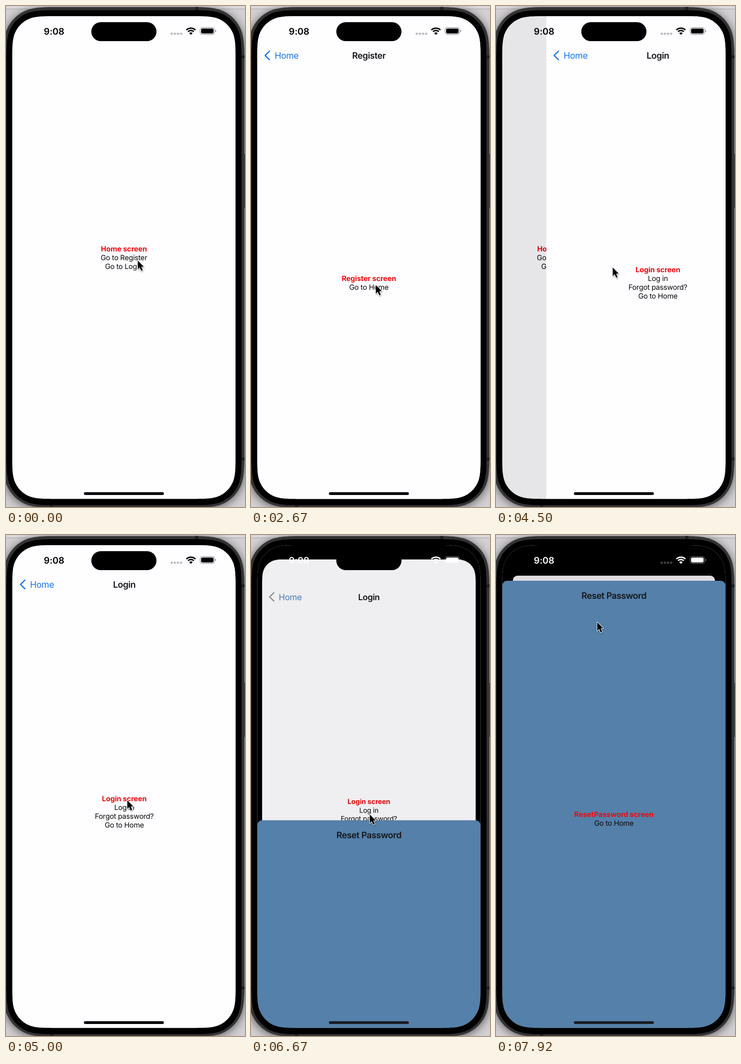
An HTML page that plays this animation: 517x1084 px, repeating every 8 s.

```html
<!DOCTYPE html>
<html lang="en">
<head>
<meta charset="utf-8">
<title>Screen navigation</title>
<style>
  html, body { margin: 0; width: 100%; height: 100%; overflow: hidden; background: #d3d0d4; }
  svg { display: block; width: 517px; height: 1084px; }
  text { font-family: Inter, "Liberation Sans", sans-serif; text-rendering: geometricPrecision; }
  .row { font-size: 15.6px; letter-spacing: -.28px; text-anchor: middle; fill: #080808; }
  .head { font-weight: 700; letter-spacing: -.1px; fill: #ee0a0c; }
  .nav { font-size: 19.1px; letter-spacing: -.42px; fill: #161618; }
  .title { font-weight: 600; letter-spacing: -.48px; text-anchor: middle; }
  .time { font-size: 19.8px; font-weight: 600; letter-spacing: -.1px; text-anchor: middle; }
</style>
</head>
<body>
<svg viewBox="0 0 517 1084" xmlns="http://www.w3.org/2000/svg">
  <defs>
    <clipPath id="screenClip"><path id="screenShape"/></clipPath>
    <clipPath id="pageClip"><path id="pageShape"/></clipPath>
    <filter id="soft" x="-20%" y="-20%" width="140%" height="140%"><feGaussianBlur stdDeviation="10"/></filter>
    <filter id="drop" x="-50%" y="-50%" width="220%" height="220%">
      <feDropShadow dx="0.6" dy="1.6" stdDeviation="1.1" flood-opacity=".4"/>
    </filter>
  </defs>

  <rect width="517" height="1084" fill="#d3d0d4"/>
  <rect width="517" height="6" fill="#dbd8dc"/>
  <rect y="6" width="517" height="1" fill="#a5a2a6"/>
  <path id="shade" fill="#000" opacity=".58" filter="url(#soft)"/>
  <rect x="514" y="320" width="3" height="117" fill="#232323"/>
  <path id="rim" fill="#333334" stroke="#555556"/>
  <g fill="#1f1f20">
    <rect x="409" y="2" width="7" height="8"/>
    <rect x="95" y="1079" width="7" height="5"/>
    <rect x="508" y="107" width="8" height="6"/>
    <rect x="508" y="977" width="8" height="6"/>
    <rect y="107" width="2" height="6"/>
    <rect y="977" width="2" height="6"/>
  </g>
  <path id="bezel" fill="#000"/>

  <g clip-path="url(#screenClip)">
    <g id="home">
      <rect x="-200" y="22" width="900" height="1045" fill="#fefdff"/>
    </g>
    <rect id="dim" x="13" y="22" width="484" height="1045"/>
    <g id="register"></g>
    <rect id="back" x="13" y="22" width="484" height="1045" fill="#000"/>
    <g id="login" clip-path="url(#pageClip)"></g>
    <g id="sheet">
      <rect x="13.5" y="0" width="483" height="1100" rx="11" fill="#5480aa"/>
    </g>
  </g>

  <rect x="184.5" y="35" width="141" height="41" rx="20.5"/>
  <g id="status">
    <text class="time" x="104" y="62">9:08</text>
    <g opacity=".25">
      <rect x="356" y="57.7" width="5" height="4.6" rx="1.4"/>
      <rect x="362.8" y="57.7" width="5" height="4.6" rx="1.4"/>
      <rect x="369.5" y="57.7" width="5" height="4.6" rx="1.4"/>
      <rect x="376.3" y="57.7" width="5" height="4.6" rx="1.4"/>
    </g>
    <g fill="none" stroke="currentColor" stroke-width="3">
      <path d="M390.2 51.8A14.2 14.2 0 0 1 409.8 51.8"/>
      <path d="M393.7 55.5A9.1 9.1 0 0 1 406.3 55.5"/>
    </g>
    <path d="M400 62.5L396.2 58.6A5.4 5.4 0 0 1 403.8 58.6Z"/>
    <rect x="419.8" y="46.6" width="31.4" height="15" rx="5" fill="none" stroke="currentColor" stroke-width="1.1" opacity=".45"/>
    <rect x="422" y="48.8" width="27" height="10.6" rx="3.2"/>
    <path d="M452.6 51.6Q454.6 52.4 454.6 54.1T452.6 56.6Z" opacity=".5"/>
  </g>
  <rect id="bar" x="168.5" y="1052" width="173" height="6" rx="3"/>
  <path id="cursor" d="M0 .8V19.4L4.2 15.6L7.5 23L10.7 21.6L7.5 14.3L13 14Z"
    stroke="#fff" stroke-width="2" stroke-linejoin="round" paint-order="stroke" filter="url(#drop)"/>
</svg>
<script>
const FPS = 12, STEPS = 96, LOOP = 8000;
const WIDTH = 483, CX = 255;
const $ = id => document.getElementById(id);

function add(parent, tag, attrs, text) {
  const el = document.createElementNS("http://www.w3.org/2000/svg", tag);
  for (const k in attrs) el.setAttribute(k, attrs[k]);
  if (text) el.textContent = text;
  return parent.appendChild(el);
}

// Rectangle whose corners ease smoothly into the straight sides.
function smoothRect(x, y, w, h, r) {
  const corner = [[1.5287, 0], [1.0885, 0], [.8684, 0], [.6315, .0749],
    [.3728, .1691], [.1691, .3728], [.0749, .6315], [0, .8684], [0, 1.0885], [0, 1.5287]];
  const side = (right, bottom) => {
    const pts = corner.map(([a, b]) =>
      [right ? x + w - a * r : x + a * r, bottom ? y + h - b * r : y + b * r].join(" "));
    if (right === bottom) pts.reverse();
    return pts[0] + "C" + pts.slice(1).join(" ");
  };
  return "M" + [side(0, 0), side(1, 0), side(1, 1), side(0, 1)].join("L") + "Z";
}

const setPath = (id, ...box) => $(id).setAttribute("d", smoothRect(...box));

// Centred rows of text; the first one is the heading.
function addRows(parent, y, rows) {
  rows.forEach((s, i) =>
    add(parent, "text", { class: i ? "row" : "row head", x: CX, y: y + i * 19.1 + 5.6 }, s));
}

function addHighlight(parent, y, width) {
  return add(parent, "rect", { x: CX - width / 2, y: y - 11.5, width, height: 23, rx: 2.5, fill: "#acabad" });
}

function addPage(id, title) {
  const g = $(id);
  add(g, "rect", { x: 13.5, y: 22, width: WIDTH + 1, height: 1045, fill: "#fefdff" });
  const chevron = add(g, "path", {
    d: "M40 97.6L30.6 107L40 116.4", fill: "none", stroke: "#1777ee",
    "stroke-width": 2.6, "stroke-linecap": "round", "stroke-linejoin": "round"
  });
  const label = add(g, "text", { class: "nav", x: 51.2, y: 113.9 }, "Home");
  label.style.fill = "#1777ee";
  add(g, "text", { class: "nav title", x: CX, y: 113.9 }, title);
  return { g, chevron, label };
}

setPath("shade", -6, 6, 522, 1082, 82);
setPath("rim", -5.5, 2.5, 521, 1083, 82);
setPath("bezel", 1, 9, 508.5, 1071, 75);
setPath("screenShape", 13.5, 22, WIDTH, 1044.5, 62);

const home = $("home"), sheet = $("sheet");
const register = addPage("register", "Register");
const login = addPage("login", "Login");
const press = {
  toRegister: addHighlight(home, 544.4, 109),
  toLogin: addHighlight(home, 563.5, 88),
  toHome: addHighlight(register.g, 608.5, 92),
  forgot: addHighlight(login.g, 608.5, 134)
};
addRows(home, 525.2, ["Home screen", "Go to Register", "Go to Login"]);
addRows(register.g, 589.4, ["Register screen", "Go to Home"]);
addRows(login.g, 570.4, ["Login screen", "Log in", "Forgot password?", "Go to Home"]);
add(sheet, "text", { class: "nav title", x: CX, y: 38.6 }, "Reset Password");
addRows(sheet, 505.6, ["ResetPassword screen", "Go to Home"]);

// step, x, y of the pointer tip
const pointer = [
  [0, 285, 550], [1, 258, 530], [2, 285, 551], [4, 285, 551], [5, 273, 546],
  [19, 273, 546], [23, 298, 572], [26, 288, 586], [29, 276, 591], [33, 268, 607],
  [39, 268, 607], [43, 262, 585], [48, 252.5, 565], [59, 252.5, 565],
  [63, 292, 598], [66, 280, 618], [69, 266, 625], [70, 267, 627], [71, 267, 627],
  [72, 272, 620], [73, 260, 610], [74, 281, 572], [75, 257, 604], [88, 257, 604],
  [89, 300, 760], [90, 430, 940], [91, 478, 996], [92, 420, 700],
  [93, 300, 330], [94, 200, 122], [95, 219, 188]
];

function pointerAt(n) {
  let i = pointer.length - 1;
  while (pointer[i][0] > n) i--;
  const a = pointer[i], b = pointer[i + 1] || a;
  const k = b === a ? 0 : (n - a[0]) / (b[0] - a[0]);
  return [a[1] + (b[1] - a[1]) * k, a[2] + (b[2] - a[2]) * k];
}

// Distance left for a screen coming in: short start, then exponential decay.
function incoming(n, start, second) {
  const d = n - start;
  if (d <= 0) return 1;
  return d < 2 ? .96 : second * Math.pow(.458, d - 2);
}

// Distance travelled by a screen going out: critically damped spring.
function outgoing(n) {
  const x = Math.max(0, 1.51 + 2.25 * (n - 38));
  return 1 - (1 + x) * Math.exp(-x);
}

const show = (el, on) => el.style.display = on ? "" : "none";
const between = (n, a, b) => n >= a && n <= b;
const mix = (a, b, k) => `rgb(${a.map((v, i) => Math.round(v + (b[i] - v) * k))})`;

function draw(n) {
  const reg = n < 30 ? incoming(n, 9, .33) : n < 43 ? outgoing(n) : 1;
  const log = incoming(n, 51, .43);
  const rest = incoming(n, 78, .536), up = 1 - rest;
  const cover = 1 - Math.min(reg, log);
  const modal = up > 0;

  home.setAttribute("transform", `translate(${-.3 * WIDTH * cover} 0)`);
  $("dim").setAttribute("opacity", .115 * cover);
  show(register.g, reg < 1);
  register.g.setAttribute("transform", `translate(${WIDTH * reg} 0)`);

  const s = 1 - .094 * up;
  show(login.g, log < 1);
  login.g.setAttribute("transform", modal
    ? `translate(${CX * (1 - s)} ${22 + 66 * up - 22 * s}) scale(${s})`
    : `translate(${WIDTH * log} 0)`);
  login.g.style.filter = modal ? `brightness(${1 - .125 * up})` : "none";
  setPath("pageShape", 13.5, 22, WIDTH, 1044.5, modal ? (62 - 51 * up) / s : 0);
  login.chevron.setAttribute("stroke", modal ? "#929295" : "#1777ee");
  login.label.style.fill = mix([23, 119, 238], [142, 142, 147], up);

  show($("back"), modal);
  show(sheet, modal);
  sheet.setAttribute("transform", `translate(0 ${99 + 967 * rest})`);

  show(press.toRegister, n === 10);
  show(press.toLogin, between(n, 50, 52));
  show(press.toHome, between(n, 36, 42));
  show(press.forgot, between(n, 77, 78));

  const ink = modal ? "#fff" : "#000";
  $("status").setAttribute("fill", ink);
  $("status").style.color = ink;
  $("bar").setAttribute("fill", modal ? "#191d22" : "#000");
  $("cursor").setAttribute("transform", `translate(${pointerAt(n).join(" ")})`);
}

const begin = performance.now();
function tick(now) {
  const t = Math.max(0, now - begin) % LOOP;
  draw(Math.min(STEPS - 1, Math.floor(t * FPS / 1000 + .09)));
  requestAnimationFrame(tick);
}
draw(0);
requestAnimationFrame(tick);
</script>
</body>
</html>
```
